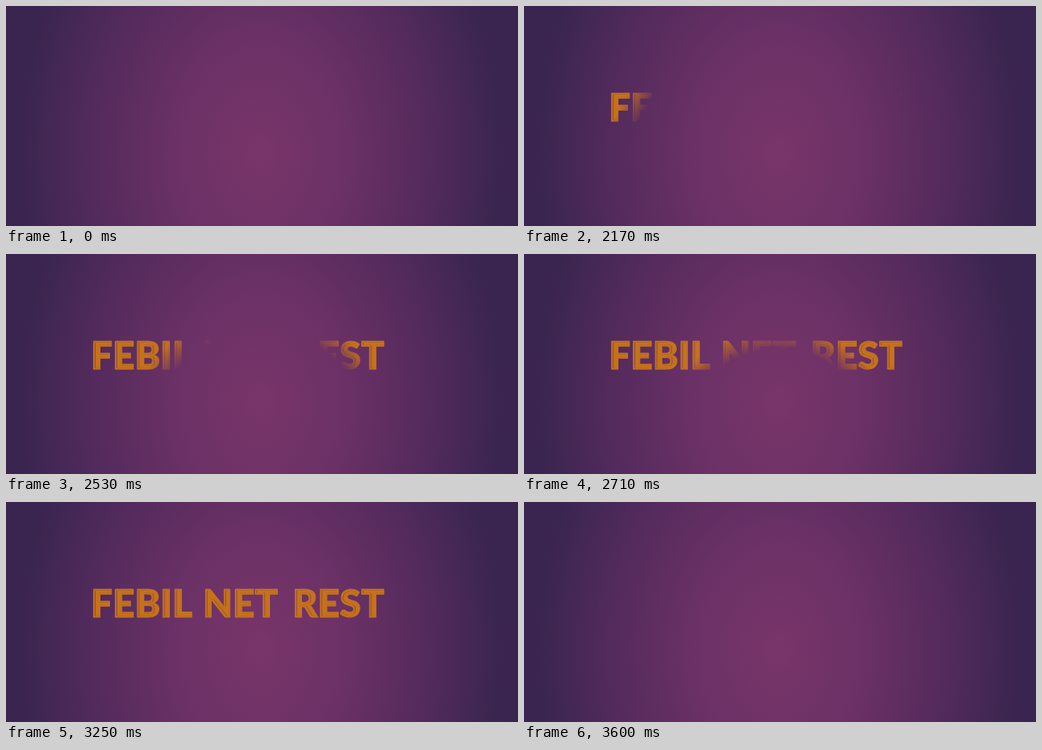
These frames come from a looping animation (640x275 px, 3.68 s). An HTML page:

```html
<!DOCTYPE html>
<html lang="en">
<head>
<meta charset="utf-8">
<title>Title reveal</title>
<style>
  html, body { margin: 0; width: 100%; height: 100%; overflow: hidden; background: #38244f; }
  svg { display: block; width: 100%; height: 100%; }
  text { font: 900 48px Lato, sans-serif; fill: #c5721c; stroke: #c5721c; stroke-width: 1; stroke-linejoin: round; }
</style>
</head>
<body>
<svg viewBox="0 0 640 275" preserveAspectRatio="none">
  <defs>
    <radialGradient id="glow" gradientUnits="userSpaceOnUse" cx="0" cy="0" r="1"
      gradientTransform="translate(318 185) scale(305 420)">
      <stop offset="0" stop-color="#783569"/>
      <stop offset=".35" stop-color="#6b3166"/>
      <stop offset=".65" stop-color="#562b5d"/>
      <stop offset="1" stop-color="#39254f"/>
    </radialGradient>
    <radialGradient id="hole" gradientUnits="userSpaceOnUse" cx="318" cy="235" r="259">
      <stop id="rim" offset=".88" stop-color="#000"/>
      <stop offset="1" stop-color="#fff"/>
    </radialGradient>
    <mask id="reveal" maskUnits="userSpaceOnUse" x="0" y="0" width="640" height="275">
      <rect width="640" height="275" fill="url(#hole)"/>
    </mask>
    <!-- Carves a thin line inside the left edge of each stroke -->
    <filter id="inline" filterUnits="userSpaceOnUse" x="90" y="95" width="410" height="65"
      color-interpolation-filters="sRGB">
      <feMorphology in="SourceAlpha" operator="erode" radius="2" result="core"/>
      <feOffset in="core" dx="1" result="shifted"/>
      <feComposite in="core" in2="shifted" operator="out" result="edge"/>
      <feFlood flood-color="#000" flood-opacity=".55"/>
      <feComposite in2="edge" operator="in" result="line"/>
      <feComposite in="SourceGraphic" in2="line" operator="out"/>
    </filter>
  </defs>
  <rect width="640" height="275" fill="url(#glow)"/>
  <g id="title" mask="url(#reveal)" visibility="hidden">
    <g filter="url(#inline)">
      <text x="106" y="144">FEBIL</text>
      <text x="246" y="144">NET</text>
      <text x="358" y="144">REST</text>
    </g>
  </g>
</svg>
<script>
const LOOP = 3680, START = 1990, END = 3520, STEP = 90, SOFT = 30;
// Time and radius of the shrinking hole
const radii = [[1990, 229], [2350, 163], [2530, 138], [2890, 94], [3250, 56], [3520, 30]];
const byId = id => document.getElementById(id);
const title = byId("title"), hole = byId("hole"), rim = byId("rim");

function radiusAt(t) {
  const i = Math.max(1, radii.findIndex(([time]) => time >= t));
  const [t0, r0] = radii[i - 1], [t1, r1] = radii[i];
  return r0 + (r1 - r0) * (t - t0) / (t1 - t0);
}

function draw(t) {
  const shown = t >= START && t < END;
  title.setAttribute("visibility", shown ? "visible" : "hidden");
  if (!shown) return;
  const r = radiusAt(START + Math.floor((t - START) / STEP) * STEP);
  hole.setAttribute("r", r + SOFT);
  rim.setAttribute("offset", r / (r + SOFT));
}

const origin = performance.now();
function tick() {
  draw((performance.now() - origin) % LOOP);
  requestAnimationFrame(tick);
}
tick();
</script>
</body>
</html>
```
